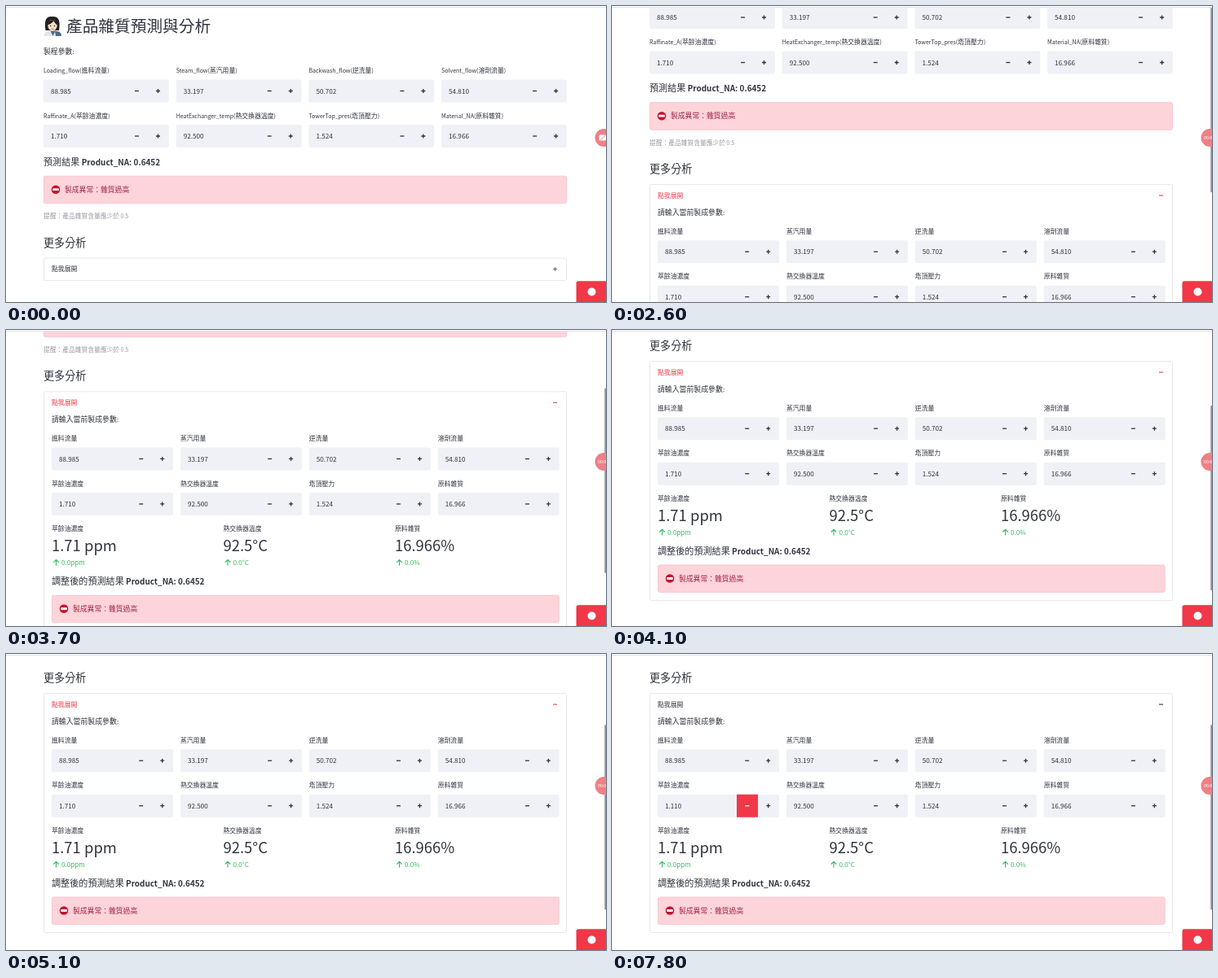
Write an HTML page that moves like this. It is 736 by 364 pixels and loops after 8000 ms.

```html
<!DOCTYPE html>
<html lang="zh-Hant">
<head>
<meta charset="utf-8">
<title>產品雜質預測與分析</title>
<style>
  html, body { margin: 0; width: 100%; height: 100%; overflow: hidden; background: #fff; }
  svg { display: block; width: 736px; height: 364px; }
  text { font-family: "Noto Sans CJK TC", "Noto Sans CJK JP", "Noto Sans CJK", sans-serif; white-space: pre; }
</style>
</head>
<body>
<svg id="stage" viewBox="0 0 736 364" xmlns="http://www.w3.org/2000/svg"></svg>
<script>
const NS = "http://www.w3.org/2000/svg";
const LOOP = 8000, STEP = 100;
const INK = "#31333f", RED = "#f03848", GREEN = "#2ebd5c", MUTED = "#97989f";
const LATIN = 1 / 1.117; // Latin letters are drawn large in the CJK family

const stage = document.getElementById("stage");

function el(parent, name, attrs = {}) {
  const node = document.createElementNS(NS, name);
  for (const key in attrs) node.setAttribute(key, attrs[key]);
  parent.appendChild(node);
  return node;
}

const group = parent => el(parent, "g");
const rect = (parent, x, y, width, height, fill, more) =>
  el(parent, "rect", { x, y, width, height, fill, ...more });
const line = (parent, d, stroke, width = 1) =>
  el(parent, "path", { d, stroke, "stroke-width": width, fill: "none" });
const shape = (parent, d, fill) => el(parent, "path", { d, fill });

// Text with Chinese and Latin runs sized separately; mid is the line's centre.
function label(parent, x, mid, str, size, fill = INK, weight = 400) {
  const node = el(parent, "text", { x, y: mid + size * 0.36, fill });
  for (const run of str.match(/[\u3000-\uffef]+|[^\u3000-\uffef]+/g)) {
    const latin = run.charCodeAt(0) < 0x3000;
    const span = el(node, "tspan", {
      "font-size": latin ? size * LATIN : size,
      "font-weight": latin ? weight : 400
    });
    span.textContent = run;
  }
  return node;
}

const minus = (parent, x, y, color = INK, w = 1.3) => line(parent, `M${x - 2.5} ${y}h5`, color, w);
const plus = (parent, x, y, w = 1.3) => line(parent, `M${x - 2.5} ${y}h5M${x} ${y - 2.5}v5`, INK, w);

function numberField(parent, x, y, width, value) {
  rect(parent, x, y, width, 28, "#f0f1f6", { rx: 2 });
  const text = label(parent, x + 9, y + 14, value, 9.1);
  minus(parent, x + width - 39.3, y + 14);
  plus(parent, x + width - 13.3, y + 14);
  return text.firstChild;
}

function fieldGrid(parent, names, x, y, width, pitch) {
  const values = ["88.985", "33.197", "50.702", "54.810", "1.710", "92.500", "1.524", "16.966"];
  return names.map((name, i) => {
    const fx = x + (i % 4) * pitch, fy = y + (i > 3 ? 55.5 : 0);
    label(parent, fx, fy - 11.2, name, 7.85);
    return numberField(parent, fx, fy, width, values[i]);
  });
}

function alertBox(parent, x, y, width) {
  rect(parent, x + .5, y + .5, width - 1, 33.5, "#fdd4da", { rx: 2, stroke: "#f9c8cf" });
  el(parent, "circle", { cx: x + 15, cy: y + 17, r: 5.3, fill: "#c4122f" });
  rect(parent, x + 11.2, y + 15.6, 7.6, 2.8, "#fff", { rx: .6 });
  label(parent, x + 26, y + 17, "製成異常：雜質過高", 8.8, "#9c2740");
}

function woman(parent) {
  const g = group(parent), hair = "#231f22";
  shape(g, "M48.500 30C46 13 52 13 57 13S67.500 14 65 30Z", hair);
  shape(g, "M46.500 37C46.500 31.500 51 30.500 57 30.500S68 31.500 68 37Z", "#e3e7ec");
  shape(g, "M60 30.700C66 31 68 33 68 37H61Z", "#4b6c8c");
  shape(g, "M54.500 30.500L57.500 37L60.500 30.500Z", "#4b6c8c");
  el(g, "ellipse", { cx: 57, cy: 23.8, rx: 5.8, ry: 6.8, fill: "#f9dcc3" });
  shape(g, "M50.500 24C50.500 15 63.500 15 63.700 24C61 22.500 59.500 20 58.500 18.500C56.500 21 53 22.500 50.500 24Z", hair);
  for (const cx of [54.5, 59.5]) el(g, "circle", { cx, cy: 24.5, r: .8, fill: hair });
  line(g, "M55.500 28q1.500 1.200 3 0", "#c0554f", .8);
}

function metric(parent, x, name, value, delta) {
  label(parent, x, 478.5, name, 7.85);
  label(parent, x, 499, value, 20.6);
  line(parent, `M${x + 5.5} 524v-7M${x + 2.3} 520l3.200 -3.200l3.200 3.200`, GREEN, 1.1);
  label(parent, x + 12, 520, delta, 9.1, GREEN);
}

// Page
const clip = el(el(stage, "defs"), "clipPath", { id: "view" });
rect(clip, 0, 2, 736, 362, "#000");
const page = group(el(stage, "g", { "clip-path": "url(#view)" }));

woman(page);
label(page, 74, 24.5, "產品雜質預測與分析", 19.7);
label(page, 46, 56, "製程參數:", 8.9);
fieldGrid(page, ["Loading_flow(進料流量)", "Steam_flow(蒸汽用量)", "Backwash_flow(逆洗量)",
  "Solvent_flow(溶劑流量)", "Raffinate_A(萃餘油濃度)", "HeatExchanger_temp(熱交換器溫度)",
  "TowerTop_pres(塔頂壓力)", "Material_NA(原料雜質)"], 46, 90.5, 153.8, 162.7);
label(page, 46, 192, "預測結果 Product_NA: 0.6452", 11.1, INK, 600);
alertBox(page, 46, 208.7, 642);
label(page, 46, 258.5, "提醒：產品雜質含量應少於 0.5", 7.75, MUTED);
label(page, 46, 290.8, "更多分析", 13.1);

const frame = rect(page, 46.5, 310, 641, 27.5, "none", { rx: 2, stroke: "#e7e8eb" });
const head = label(page, 56, 323.5, "點我展開", 7.85);
const openSign = plus(page, 673.5, 323.5, .7);
const closeSign = minus(page, 673.5, 323.5, INK, 1.1);

const footer = label(page, 46, 440.5, "Made with ", 7.9, MUTED);
const maker = el(footer, "tspan", { "font-size": 7.9 * LATIN, fill: "#6b6d76" });
maker.textContent = "Streamlit";

// Expanded panel
const panel = group(page);
label(panel, 56, 344, "請輸入當前製成參數:", 8.9);
const fields = fieldGrid(panel, ["進料流量", "蒸汽用量", "逆洗量", "溶劑流量",
  "萃餘油濃度", "熱交換器溫度", "塔頂壓力", "原料雜質"], 56, 378.7, 149, 157.9);
const pressed = group(panel);
rect(pressed, 153, 434.2, 26, 28, RED);
minus(pressed, 165.7, 448.2, "#fff");
metric(panel, 56, "萃餘油濃度", "1.71 ppm", "0.0ppm");
metric(panel, 266.5, "熱交換器溫度", "92.5°C", "0.0°C");
metric(panel, 477, "原料雜質", "16.966%", "0.0%");
label(panel, 56, 543.5, "調整後的預測結果 Product_NA: 0.6452", 11.1, INK, 600);
alertBox(panel, 56, 560, 622.7);

// Fixed overlay
rect(stage, 0, 1, 736, 1, "#e2e2e4");
const thumb = rect(stage, 734.3, 0, 1.7, 227, "#8f9093");
el(stage, "circle", { cx: 733.5, cy: 162, r: 11, fill: "#ee8086" });
const camera = group(stage);
rect(camera, 727.5, 158.5, 8.5, 7, "#fff", { rx: 1.2 });
line(camera, "M729 165l6 -6", "#ee8086", .9);
const clock = label(stage, 726, 162.3, "00:0", 5.8, "#fff");
shape(stage, "M699.500 364V341q0 -2.800 2.800 -2.800H736V364Z", RED);
el(stage, "circle", { cx: 718.5, cy: 351.5, r: 5, fill: "#fff" });

// Motion: [time, scroll, power], each segment eased out by its power
const scrollKeys = [[0, 0, 1], [300, 0, 1], [900, 87, 1.8], [2500, 87, 1], [2600, 90.5, 1], [2900, 92, 1],
  [3100, 92, 1], [3400, 172.5, 1], [4000, 268, 1.5], [4100, 271.5, 1], [4400, 276, 1.5],
  [4600, 276, 1], [5100, 261.5, 1.6], [LOOP, 261.5, 1]];
const valueKeys = [[0, "1.710"], [7000, "1.610"], [7100, "1.510"], [7400, "1.310"], [7600, "1.210"], [7800, "1.110"]];

function scrollAt(t) {
  const i = Math.max(1, scrollKeys.findIndex(k => t <= k[0]));
  const [t0, a] = scrollKeys[i - 1], [t1, b, power] = scrollKeys[i];
  return a + (b - a) * (1 - Math.pow(1 - (t - t0) / (t1 - t0), power));
}

const show = (node, on) => node.setAttribute("display", on ? "inline" : "none");

function draw(time) {
  const t = Math.floor((time % LOOP) / STEP) * STEP;
  const scroll = scrollAt(t), open = t >= 2600, clicked = t >= 7000;
  page.setAttribute("transform", `translate(0 ${-scroll})`);

  show(panel, open);
  show(footer, !open);
  show(openSign, !open);
  show(closeSign, open);
  show(pressed, clicked);
  frame.setAttribute("height", open ? 294 : 27.5);
  const headColor = open && !clicked ? RED : INK;
  head.setAttribute("fill", headColor);
  head.querySelectorAll("tspan").forEach(s => s.setAttribute("fill", headColor));
  closeSign.setAttribute("stroke", headColor);
  fields[4].textContent = valueKeys.filter(k => k[0] <= t).pop()[1];

  show(thumb, t >= 400);
  const top = open ? Math.max(2, 93 + (scroll - 271.5) * .57) : 18 * scroll / 87;
  thumb.setAttribute("y", top);
  thumb.setAttribute("height", open ? 227 : 364);
  show(camera, t < 100);
  show(clock, t >= 100);
}

function tick(now) {
  draw(now);
  requestAnimationFrame(tick);
}
draw(0);
requestAnimationFrame(tick);
</script>
</body>
</html>
```
